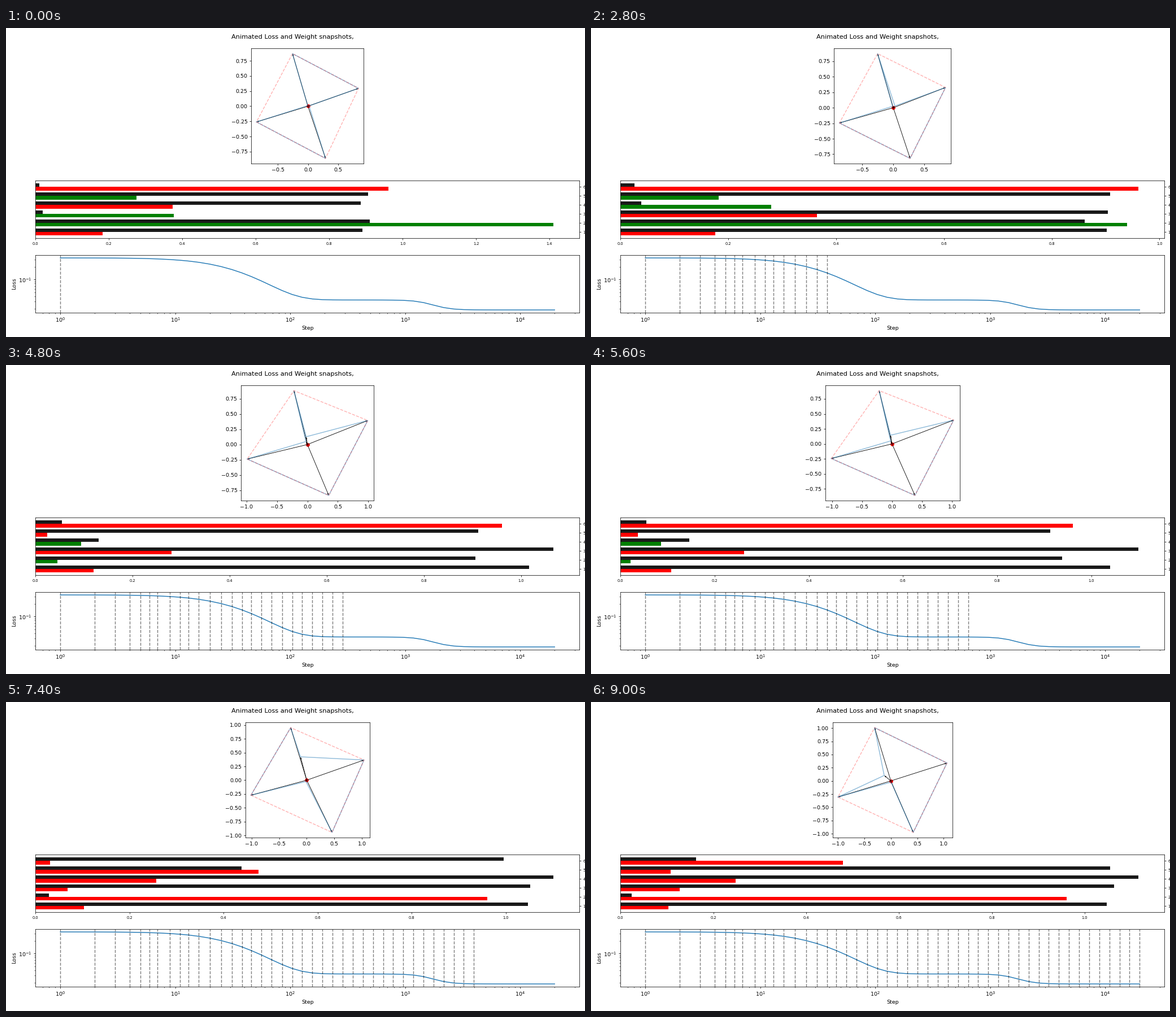
A matplotlib script for the animation above (9200 ms loop, 1025 by 547 pixels).

```python
import numpy as np
import matplotlib.pyplot as plt
from matplotlib.animation import FuncAnimation

W, H, DPI = 1025, 547, 64
SCALE = 68.35 / DPI  # point sizes below are meant for 68.35 dpi

for key in ("font.size", "axes.linewidth", "axes.labelpad", "lines.linewidth", "lines.markersize"):
    plt.rcParams[key] *= SCALE
for axis in "xy":
    for part in ("major.size", "major.width", "major.pad", "minor.size", "minor.width", "minor.pad"):
        plt.rcParams[f"{axis}tick.{part}"] *= SCALE

# Snapshot steps: log-spaced and unique
STEPS = np.unique((np.logspace(0, np.log10(20000), 50) + 1e-9).astype(int))
N = len(STEPS)


def sigmoid(i, centre, width):
    return 1 / (1 + np.exp(-(i - centre) / width))


def modes(i):
    """Shared time courses of the training at snapshot i."""
    t = STEPS[i] - 1
    warm = t - 9 * (1 - 0.9 ** t)  # momentum 0.9 delays the start
    return {
        "relax": 1 - np.exp(-0.0147 * warm),
        "grow": sigmoid(i, 20.4, 2.6),
        "switch": sigmoid(i, 32.7, 0.9),
        "pulse": np.exp(-(i - 34.5) ** 2),
        "flip": sigmoid(i, 36.4, 0.3),
        "drift": np.clip((i - 37) / 8, 0, 1),
    }


def mix(start, **amps):
    """A quantity that follows a weighted sum of modes."""
    return lambda m: start + sum(a * m[name] for name, a in amps.items())


# Norm, angle in degrees and bias of each feature; the first four are the corners
FEATURES = [
    (mix(0.890, grow=0.158),
     mix(197, relax=-3.5, switch=1.6, drift=1.9),
     mix(-0.182, grow=0.079)),
    (mix(0.910, relax=-0.20, grow=0.24, switch=0.103, drift=0.011),
     mix(-71.4, relax=-2.5, grow=8.3, switch=1.5, drift=-2.4),
     mix(1.411, relax=-1.39, switch=-0.09, drift=-0.058)),
    (mix(0.886, grow=0.226, switch=-0.010, drift=0.014),
     mix(19.5, relax=6, grow=-4.6, switch=-1.5, drift=-1.7),
     mix(-0.374, grow=0.118, drift=0.008)),
    (mix(0.906, relax=0.006, switch=0.085, drift=0.058),
     mix(106.4, grow=-3, switch=3.6),
     mix(0.275, relax=-0.26, grow=-0.055, switch=0.009, drift=-0.077)),
    (mix(0.020, relax=0.03, grow=0.10, switch=0.291, pulse=0.08, drift=-0.278),
     mix(18.9, relax=81, switch=5, drift=36),
     mix(0.377, relax=-0.288, switch=-0.568)),
    (mix(0.010, relax=0.045, switch=-0.027, drift=-0.004),
     mix(116, flip=142, drift=21),
     mix(-0.961)),
]


def state(i):
    """Weights as complex numbers, and biases."""
    m = modes(i)
    norm, angle, bias = np.array([[f(m) for f in feature] for feature in FEATURES]).T
    return norm * np.exp(1j * np.radians(angle)), bias


def loss(i):
    m = modes(i)
    return 0.0188 + 0.0137 * (1 - m["switch"]) + 0.2955 * (1 - m["relax"]) ** 2.35


def add_axes(top, bottom):
    left, right = 52.4, 1015
    return fig.add_axes([left / W, 1 - bottom / H, (right - left) / W, (bottom - top) / H])


def padded(v):
    pad = 0.05 * np.ptp(v)
    return v.min() - pad, v.max() + pad


def set_loop(line, z):
    z = np.append(z, z[0])
    line.set_data(z.real, z.imag)


fig = plt.figure(figsize=(W / DPI, H / DPI), dpi=DPI)
fig.suptitle("Animated Loss and Weight snapshots,", x=398.8 / W, ha="left")

# Weight vectors
ax_w = add_axes(36.1, 240.1)
ax_w.set_aspect("equal")
ax_w.scatter([0], [0], color="red", zorder=1)
arrows = ax_w.quiver(np.zeros(6), np.zeros(6), np.ones(6), np.ones(6), angles="xy",
                     scale_units="xy", scale=1, units="dots", width=0.85, zorder=1.5)
poly, = ax_w.plot([], [], color="C0", alpha=0.5)
hull, = ax_w.plot([], [], "--", color="red", alpha=0.3)

# Norms and biases
ax_b = add_axes(270.1, 372.1)
rows = np.arange(1, 7)
norm_bars = ax_b.barh(rows + 0.2, np.ones(6), height=0.4, color="black", alpha=0.9)
bias_bars = ax_b.barh(rows - 0.2, np.ones(6), height=0.4)
ax_b.set_ylim(0.31, 6.69)
ax_b.yaxis.tick_right()
ax_b.set_yticks(rows)
ax_b.tick_params(labelsize=7 * SCALE)

# Loss curve
ax_l = add_axes(402.4, 503.7)
ax_l.loglog(STEPS, loss(np.arange(N)))
ax_l.set_xlabel("Step")
ax_l.set_ylabel("Loss")
marks = [ax_l.axvline(s, color="black", ls="--", alpha=0.5) for s in STEPS]


def update(i):
    z, bias = state(i)
    set_loop(hull, z[:4])

    order = np.argsort(np.angle(z))
    z, bias = z[order], bias[order]
    set_loop(poly, z)
    arrows.set_UVC(z.real, z.imag)
    ax_w.set_xlim(*padded(z.real))
    ax_w.set_ylim(*padded(z.imag))

    for norm_bar, bias_bar, norm, b in zip(norm_bars, bias_bars, abs(z), bias):
        norm_bar.set_width(norm)
        bias_bar.set_width(abs(b))
        bias_bar.set_facecolor("green" if b > 0 else "red")
    ax_b.set_xlim(0, 1.05 * max(abs(z).max(), abs(bias).max()))

    for k, mark in enumerate(marks):
        mark.set_visible(k <= i)
    return []


anim = FuncAnimation(fig, update, frames=N, interval=200, repeat=True)
plt.show()
```
